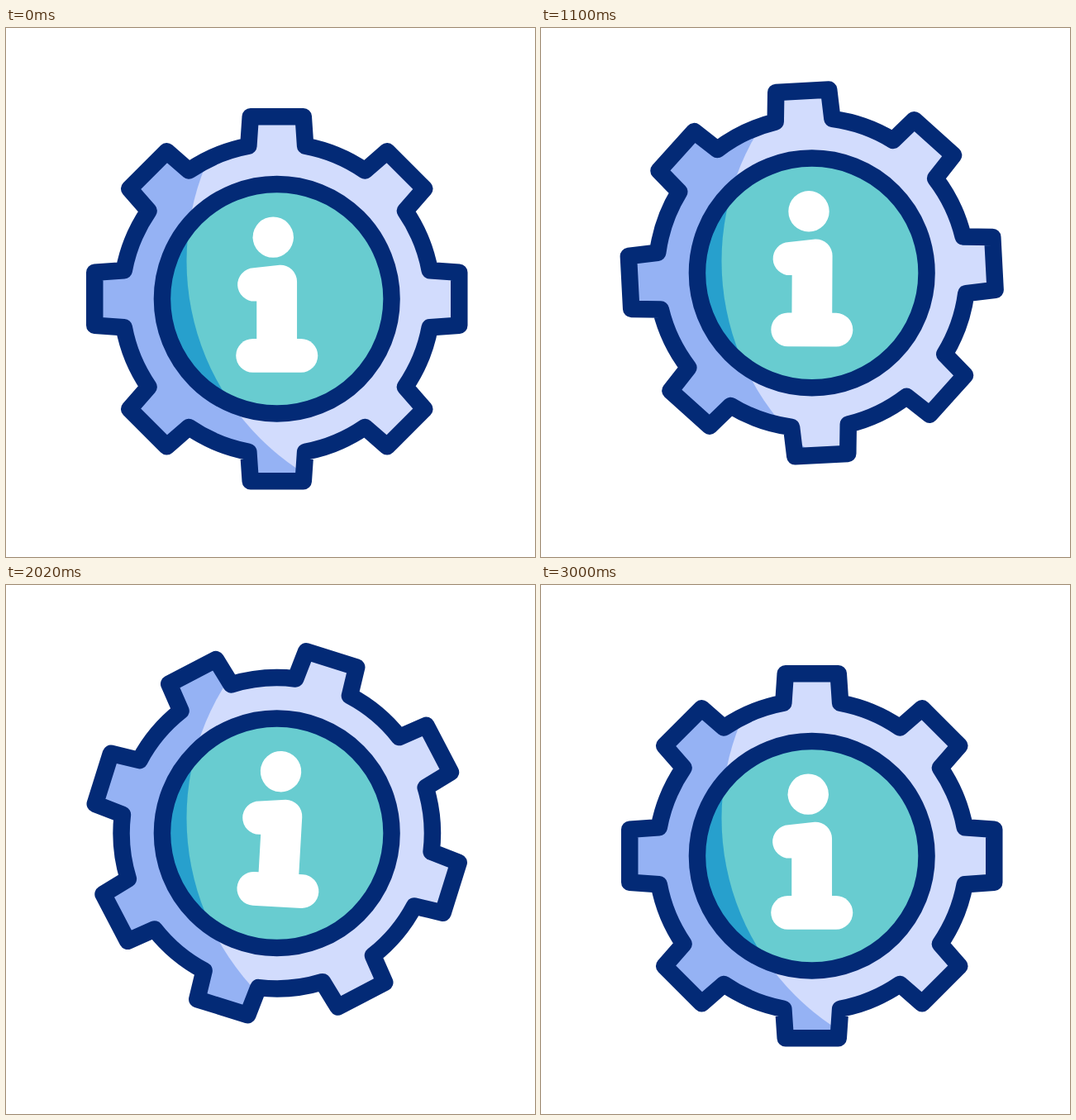
These frames come from a looping animation (640x640 px, 3.02 s). An HTML page:

```html
<!DOCTYPE html>
<html lang="en">
<head>
<meta charset="utf-8">
<title>Info gear</title>
<style>
  html, body { margin: 0; width: 100%; height: 100%; overflow: hidden; background: #fff; }
  svg { display: block; width: 100%; height: 100%; }
  .line { fill: none; stroke: #032a76; stroke-width: 20.5; stroke-linejoin: round; }
</style>
</head>
<body>
<svg viewBox="0 0 640 640">
  <defs>
    <path id="gear"/>
    <circle id="disc" r="138.8"/>
    <circle id="light" cx="521.5" cy="282" r="303"/>
    <clipPath id="gearClip"><use href="#gear" class="spin"/></clipPath>
    <clipPath id="discClip"><use href="#disc" class="lift"/></clipPath>
  </defs>

  <use href="#gear" class="spin" fill="#95b2f4"/>
  <g clip-path="url(#gearClip)"><use href="#light" fill="#d2dcfd"/></g>
  <use href="#gear" class="spin line"/>

  <use href="#disc" class="lift" fill="#27a0cd"/>
  <g clip-path="url(#discClip)"><use href="#light" fill="#68ccd0"/></g>
  <use href="#disc" class="lift line"/>

  <!-- The letter's origin is the middle of its foot, where it pivots. -->
  <g id="letter" fill="#fff">
    <circle cx="-4.5" cy="-163.6" r="24.7"/>
    <path d="M-26.5 -86.2 a20.1 20.1 0 0 1 -2 -40.2 L3.3 -129.9 a20 20 0 0 1 21 20 V-30 H-24.5 V-86.2 Z"/>
    <rect x="-49.5" y="-40.7" width="99" height="40.7" rx="20.3"/>
  </g>
</svg>
<script>
const LOOP = 3020, SPAN = 3000, STEP = 20;
const CENTER = 327.75, RISE = 38, FOOT = 89;
const TILTS = [0, 10.84, -12.64, 7.85, 0];

const all = selector => document.querySelectorAll(selector);
const letter = document.getElementById('letter');
const ease = s => s * s * (3 - 2 * s);

function gearPath() {
  const tooth = [[-34.4, -185], [-32, -220.5], [32, -220.5], [34.4, -185]];
  const radius = Math.hypot(...tooth[0]);
  let d = '';
  for (let i = 0; i < 8; i++) {
    const a = i * Math.PI / 4, c = Math.cos(a), s = Math.sin(a);
    const points = tooth.map(([x, y]) => `${x * c - y * s} ${x * s + y * c}`);
    d += (i ? `A${radius} ${radius} 0 0 1 ` : 'M') + points.join('L');
  }
  return `${d}A${radius} ${radius} 0 0 1 ${tooth[0].join(' ')}Z`;
}

// Eased value at progress p through evenly spaced keys.
function along(keys, p) {
  const x = p * (keys.length - 1);
  const i = Math.min(Math.floor(x), keys.length - 2);
  return keys[i] + (keys[i + 1] - keys[i]) * ease(x - i);
}

function place(selector, transform) {
  all(selector).forEach(el => el.setAttribute('transform', transform));
}

function draw(time) {
  const t = Math.floor((time % LOOP) / STEP) * STEP;
  const p = Math.min(t / SPAN, 1);
  const y = CENTER - along([0, RISE, 0], p);
  place('.lift', `translate(${CENTER} ${y})`);
  place('.spin', `translate(${CENTER} ${y}) rotate(${360 * p})`);
  letter.setAttribute('transform',
    `translate(${CENTER} ${y + FOOT}) rotate(${along(TILTS, p)})`);
}

document.getElementById('gear').setAttribute('d', gearPath());
draw(0);

let start;
function tick(now) {
  start ??= now;
  draw(now - start);
  requestAnimationFrame(tick);
}
requestAnimationFrame(tick);
</script>
</body>
</html>
```
